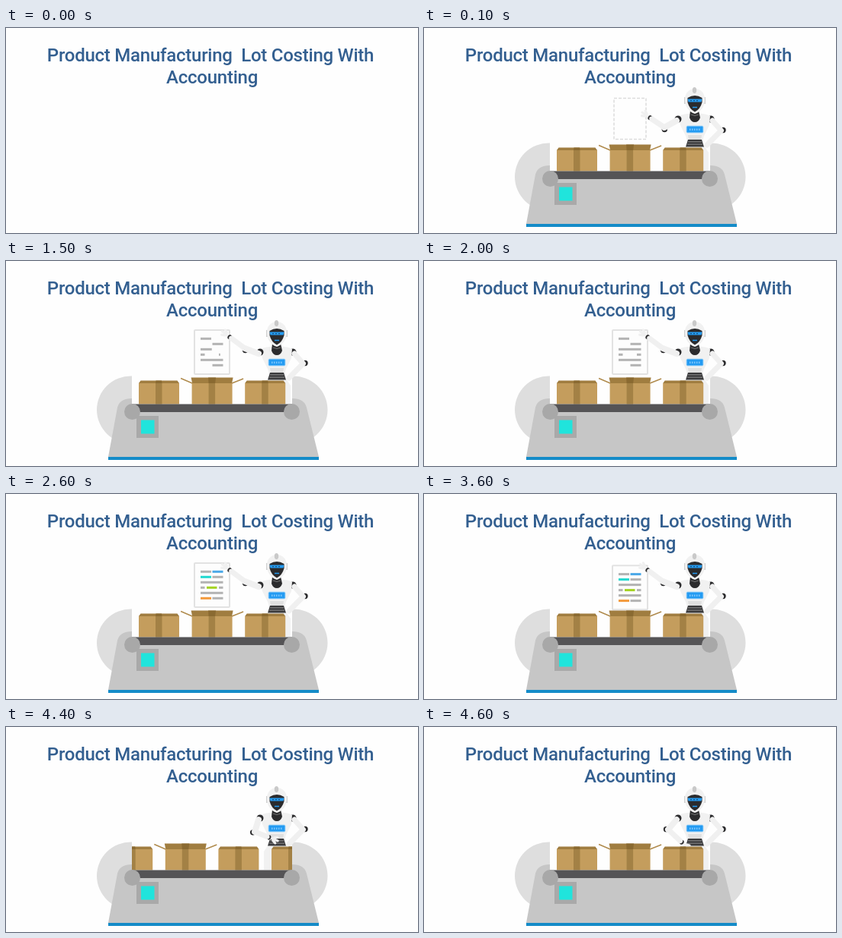
Write an HTML page that moves like this. It is 540 px wide and 270 px high and loops after 4700 ms.

```html
<!DOCTYPE html>
<html lang="en">
<head>
<meta charset="utf-8">
<title>Lot costing</title>
<style>
  html, body { margin: 0; width: 100%; height: 100%; overflow: hidden; background: #fefefe; }
  svg { display: block; width: 100vw; height: 100vh; }
  text { font: 500 24px Roboto, sans-serif; letter-spacing: -.25px; fill: #335f90; text-anchor: middle; }
  .white { fill: #f1f1f1; }
  .dark { fill: #2b2b2d; }
  .limb { stroke: #f0f0f0; stroke-linecap: round; stroke-linejoin: round; fill: none; }
</style>
</head>
<body>
<svg viewBox="0 0 540 270">
  <defs>
    <clipPath id="window"><rect x="165" y="60" width="210" height="130"/></clipPath>
    <clipPath id="aboveBox"><rect x="230" y="50" width="80" height="104"/></clipPath>
    <g id="boxFront">
      <path d="M-26.500 161H26.500V188.500H-26.500Z" fill="#c49d5d"/>
      <path d="M-4.500 161H4V188.500H-4.500Z" fill="#a38145"/>
    </g>
    <g id="closedBox">
      <use href="#boxFront"/>
      <path d="M-24 157.500H24L26.500 161H-26.500Z" fill="#a07d40"/>
      <path d="M-4 157.500H3.500L4 161H-4.500Z" fill="#8a6a31"/>
    </g>
    <g id="openBox">
      <path d="M-26 161L-41 154.500M26 161L41 155" stroke="#b08b4d" stroke-width="1.500"/>
      <use href="#boxFront"/>
      <path d="M-27.500 153.500H27.500L26 161H-26Z" fill="#a07d40"/>
      <path d="M-5 153.500H5L4 161H-4.500Z" fill="#8a6a31"/>
    </g>
  </defs>

  <text x="268" y="44" xml:space="preserve">Product Manufacturing&#160; Lot Costing With</text>
  <text x="270" y="73">Accounting</text>

  <g id="scene">
    <path d="M165 151.500A44.500 44.500 0 1 0 165 240.500ZM375 151.500A44.500 44.500 0 1 1 375 240.500Z" fill="none"/>
    <path d="M165 151.600A44.500 44.500 0 0 0 119 196A44.500 44.500 0 0 0 165 240.400ZM375 151.600A44.500 44.500 0 0 1 421.500 196A44.500 44.500 0 0 1 375 240.400Z" fill="#dedede"/>
    <path d="M134 258L146 193Q149 181 165 181V198H375V181Q391 181 394 193L410 258Z" fill="#c6c6c6"/>
    <path d="M134 258H410V262H134Z" fill="#148bc8"/>
    <path d="M171 204H200V233H171Z" fill="#a9a9a9"/>
    <path d="M177 209.500H194.500V227.500H177Z" fill="#20e4dc"/>

    <rect id="outline" x="249" y="92.500" width="42" height="54" fill="none" stroke="#dcdcdc" stroke-width="1.500" stroke-dasharray="4 2"/>
    <g clip-path="url(#aboveBox)">
      <g id="page">
        <rect x="247" y="91" width="46" height="58" rx="1" fill="#fdfdfd" stroke="#e2e2e2" stroke-width="2"/>
        <g id="rows"></g>
      </g>
    </g>

    <g id="robot">
      <circle class="dark" cx="392" cy="134.500" r="3.700"/>
      <circle class="dark" cx="376" cy="120" r="4.500"/>
      <path class="limb" d="M378 122L389.500 135L371 154" stroke-width="7"/>
      <path class="white" d="M344 155H367L373 164V188H338V164Z"/>
      <path class="white" d="M334 116Q342 112 355 113Q368 112 375 116L374 128L367 142L365 149H345L343 142L336 128Z"/>
      <path d="M346 141H364L363 147H347Z" fill="#e0e0e0"/>
      <path d="M346 147H364L367 156.500H343Z" fill="#3a3a3c"/>
      <path d="M346 149.800H364M345 153.200H365" stroke="#8a8a8a"/>
      <path class="dark" d="M349 109H360L362 118Q360 124 355 124Q350 124 348 118Z"/>
      <path d="M350 114Q355 117 360 114" fill="none" stroke="#777"/>
      <rect x="344" y="129" width="22" height="9" rx="1.500" fill="#249bf2" stroke="#a9d8f8"/>
      <path d="M348 133.800H362" stroke="#7cc6fb" stroke-width="2.500" stroke-dasharray="1.500 1.500"/>
      <path d="M341 91H344V100H341ZM366 91H369V100H366Z" fill="#cfcfcf"/>
      <path class="white" d="M342 95C341 75 369 75 368 95C368 102 364 110 355 113C346 110 342 102 342 95Z"/>
      <ellipse cx="354.500" cy="82" rx="2.700" ry="4" fill="#c9c9c9"/>
      <path class="dark" d="M345.500 92Q355 86 364.500 92V98Q362 107 355 110.500Q348 107 345.500 98Z"/>
      <path d="M345.500 93.500H364.500L363.500 97.500H346.500Z" fill="#249bf2"/>
      <path d="M349 95.700H361" stroke="#123c66" stroke-dasharray="2 2"/>
      <path d="M352 104.500H358" stroke="#249bf2" stroke-width="1.500"/>
      <circle class="dark" cx="333" cy="120" r="4.500"/>
      <circle class="dark" id="elbow" r="3.700"/>
      <path class="limb" id="upper" stroke-width="8"/>
      <path class="limb" id="fore" stroke-width="7"/>
      <g id="hand">
        <path class="dark" d="M-1.500-3Q2.500 0-1.500 3L1 3Q4 0 1-3Z"/>
        <path class="limb" d="M4 0H6M6-2L10-4M7 0H12M6 2L10 4" stroke-width="3.200"/>
      </g>
    </g>

    <g id="boxes" clip-path="url(#window)"></g>
    <path d="M165 188.500H375V199H165Z" fill="#555456"/>
    <g fill="#a8a8a8"><circle cx="165.500" cy="198.500" r="10.500"/><circle cx="374.500" cy="198.500" r="10.500"/></g>
  </g>
</svg>
<script>
const LOOP = 4700, STEP = 100, PITCH = 69.6;
const SHOULDER = [331, 122];
const $ = id => document.getElementById(id);
const set = (el, attrs) => { for (const k in attrs) el.setAttribute(k, attrs[k]); };
const add = (parent, tag, attrs) => {
  const el = document.createElementNS('http://www.w3.org/2000/svg', tag);
  set(el, attrs);
  return parent.appendChild(el);
};
const ramp = (t, from, to) => Math.min(1, Math.max(0, (t - from) / (to - from)));

// x, row, width, colour, start and end of growth
const GREY = '#b3b3b3';
const bars = [
  [255, 0, 14, GREY, 1200, 1400], [270.5, 1, 14, GREY, 1200, 1500],
  [255, 2, 29.5, GREY, 1200, 1800], [255, 3, 5.5, GREY, 1300, 1500],
  [279, 3, 5.5, GREY, 1400, 1700], [255, 4, 29.5, GREY, 1200, 1500],
  [270.5, 5, 14, GREY, 1300, 1500],
  [270.5, 0, 14, '#4aa8e8', 2100, 2300], [255, 1, 14, '#22d9d0', 2200, 2400],
  [263, 3, 13.5, '#a4d322', 2300, 2500], [255, 5, 14, '#f39a3c', 2400, 2600]
].map(([x, row, width, fill, from, to]) => ({
  width, from, to,
  el: add($('rows'), 'rect', { x, y: 100.8 + row * 7, height: 3, fill })
}));

const boxes = [-1, 0, 1, 2].map(slot => ({ slot, el: add($('boxes'), 'use', {}) }));

// time, elbow x y, wrist x y
const poses = [
  [100, 315, 131, 296, 118], [600, 313, 108, 297, 78], [800, 313, 115, 293, 100],
  [3600, 313, 115, 293, 100], [4200, 332, 141, 352, 139], [4600, 320, 135, 338, 152],
  [LOOP, 320, 135, 338, 152]
];

function poseAt(t) {
  const i = Math.max(1, poses.findIndex(p => p[0] > t));
  const [a, b] = [poses[i - 1], poses[i]];
  const k = ramp(t, a[0], b[0]);
  return a.slice(1).map((v, n) => v + (b[n + 1] - v) * k);
}

function drawArm(t) {
  const [ex, ey, wx, wy] = poseAt(t);
  const [sx, sy] = SHOULDER;
  const angle = Math.atan2(wy - ey, wx - ex) * 180 / Math.PI;
  // the dark joint peeks out on the outer side of the bend
  const bend = Math.atan2(ey - (sy + wy) / 2, ex - (sx + wx) / 2);
  set($('upper'), { d: `M${sx} ${sy}L${ex} ${ey}` });
  set($('fore'), { d: `M${ex} ${ey}L${wx} ${wy}` });
  set($('elbow'), { cx: ex + 2.5 * Math.cos(bend), cy: ey + 2.5 * Math.sin(bend) });
  set($('hand'), { transform: `translate(${wx} ${wy}) rotate(${angle})` });
}

function drawPage(t) {
  const lift = -25 * (1 - ramp(t, 600, 800));
  const fall = 62 * ramp(t, 3480, 4000) ** 2;
  set($('page'), { transform: `translate(0 ${lift + fall})`, opacity: t < 4000 ? ramp(t, 400, 600) : 0 });
  set($('outline'), { opacity: t < 700 ? 1 : 0 });
  for (const b of bars) set(b.el, { width: b.width * ramp(t, b.from, b.to) });
}

function drawBoxes(t) {
  const openSlot = t < 4100 ? 1 : t < 4200 ? null : 0;
  const shift = PITCH * ramp(t, 4200, 4600);
  for (const { slot, el } of boxes)
    set(el, { href: slot === openSlot ? '#openBox' : '#closedBox', x: 200.5 + slot * PITCH + shift });
}

function frame() {
  const t = Math.floor(performance.now() % LOOP / STEP) * STEP;
  set($('scene'), { visibility: t < 100 ? 'hidden' : 'visible' });
  drawArm(t);
  drawPage(t);
  drawBoxes(t);
  requestAnimationFrame(frame);
}
frame();
</script>
</body>
</html>
```
